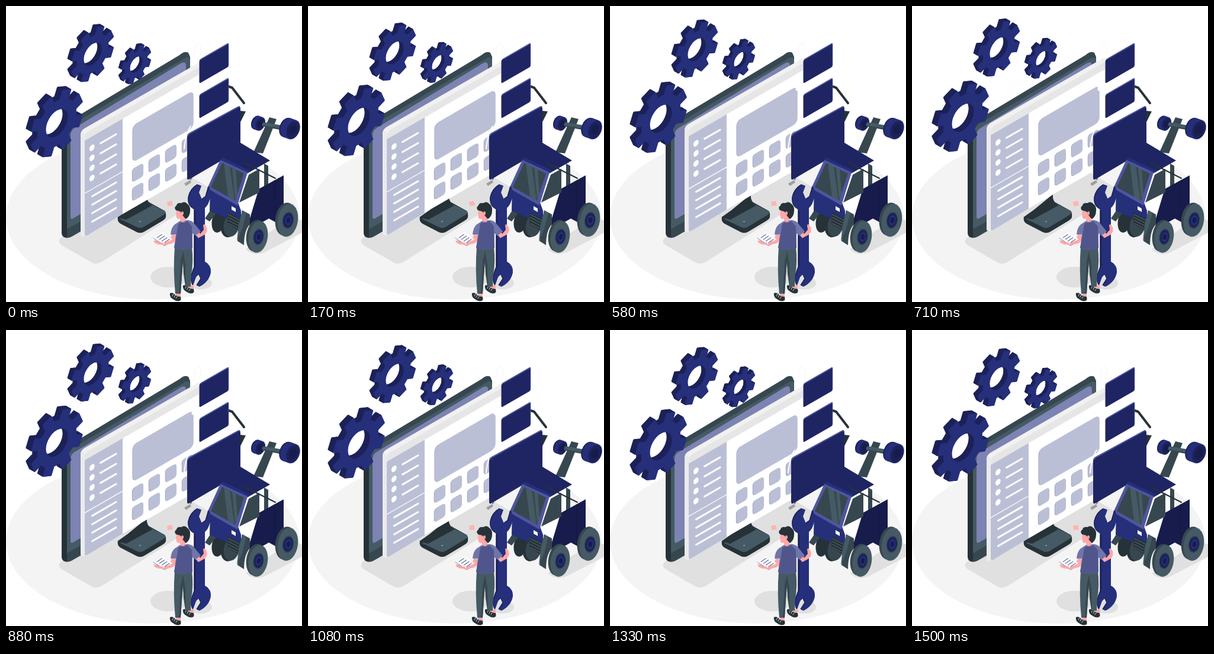
These frames come from a looping animation (500x500 px, 1.54 s). An HTML page with a canvas:

```html
<!DOCTYPE html>
<html lang="en">
<head>
<meta charset="utf-8">
<style>
html, body { margin: 0; width: 100%; height: 100%; overflow: hidden; background: #fff; }
canvas { display: block; width: 500px; height: 500px; }
</style>
</head>
<body>
<canvas id="stage"></canvas>
<script>
const LOOP = 1540, FRAME = 1000 / 24, FRAMES = 37, LIFT = 10;
const COS = 0.866, SIN = 0.5;
const NAVY = '#262f7a', DEEP = '#1c2258', NIGHT = '#171c4c', PANEL = '#1f2562', EDGE = '#4f569f';
const SLATE = '#455a64', STEEL = '#37474f', INK = '#263238';
const LILAC = '#bbbfd6', SCREEN = '#7d83b2', SKIN = '#ffa8a7', SLEEVE = '#7075a9', VEST = '#50568c';

const canvas = document.getElementById('stage');
const ctx = canvas.getContext('2d');
const scale = window.devicePixelRatio || 1;
canvas.width = canvas.height = 500 * scale;

function fill(color, path) {
  ctx.fillStyle = color;
  ctx.fill(new Path2D(path));
}

function line(color, width, path) {
  ctx.strokeStyle = color;
  ctx.lineWidth = width;
  ctx.lineCap = ctx.lineJoin = 'round';
  ctx.stroke(new Path2D(path));
}

function oval(color, x, y, rx, ry, tilt = 0) {
  ctx.fillStyle = color;
  ctx.beginPath();
  ctx.ellipse(x, y, rx, ry, tilt, 0, Math.PI * 2);
  ctx.fill();
}

// Draws on the isometric plane that rises to the right, with its origin at x, y.
function onWall(x, y, draw) {
  ctx.save();
  ctx.transform(COS, -SIN, 0, 1, x, y);
  draw();
  ctx.restore();
}

// Rounded wall rectangle whose top left corner is x, y; width is measured on screen.
function wallRect(color, x, y, width, height, radius) {
  onWall(x, y, () => {
    ctx.fillStyle = color;
    ctx.beginPath();
    ctx.roundRect(0, 0, width / COS, height, radius);
    ctx.fill();
  });
}

function gearPath(radius) {
  const path = new Path2D();
  const rad = Math.PI / 180;
  for (let i = 0; i < 8; i++) {
    const mid = 22.5 + i * 45;
    for (const [turn, size] of [[-13, 0.72], [-9.5, 0.98], [9.5, 0.98], [13, 0.72]]) {
      const a = (mid + turn) * rad, r = radius * size;
      path.lineTo(Math.cos(a) * r, -Math.sin(a) * r);
    }
  }
  path.closePath();
  const hole = radius * 0.44;
  path.moveTo(hole, 0);
  path.arc(0, 0, hole, 0, Math.PI * 2);
  return path;
}

function gear(x, y, radius) {
  const path = gearPath(radius), steps = 20;
  for (let i = steps; i >= 0; i--) {
    const depth = radius * 0.2 * i / steps;
    onWall(x - depth * COS, y - depth * SIN, () => {
      ctx.fillStyle = ctx.strokeStyle = i ? DEEP : NAVY;
      ctx.lineWidth = radius * 0.05;
      ctx.lineJoin = 'round';
      ctx.fill(path, 'evenodd');
      ctx.stroke(path);
    });
  }
}

function floor() {
  oval('#f4f4f4', 248, 357, 248, 139);
  fill('#e0e0e0', 'M92 392L285 272L352 312L162 432Q153 438 144 433L94 404Q86 398 92 392Z');
  oval('#e0e0e0', 275, 458, 31, 17.5);
  oval('#e0e0e0', 328, 468, 20, 11);
  fill('#e0e0e0', 'M405 411L482 356L500 362L500 383L437 416Q420 424 405 411Z');
}

function monitor() {
  fill(STEEL, 'M94 216Q94 204 106 195L293 83Q302 75 308 79L311 86L311 274L112 389Q104 394 97 390Q94 387 94 382Z');
  fill(SLATE, 'M103 216Q103 207 112 200L299 90Q311 82 311 94L311 258L103 377Z');
  fill(INK, 'M94 216L103 219L103 391Q94 391 94 382Z');
  fill(SCREEN, 'M109 218Q109 210 116 206L295 97Q304 92 304 101L304 247L113 359Q109 361 109 356Z');
}

function stand() {
  fill(INK, 'M189 357L239 330L268 346Q271 349 270 357Q269 360 264 363L234 381Q228 385 221 382L194 368Q187 364 189 357Z');
  fill(SLATE, 'M194 358L243 334L267 346Q272 349 266 353L233 373Q227 377 220 373L193 360Z');
  fill(INK, 'M188 357L205 345L238 318L238 324Q240 333 247 337L203 361Z');
  oval('#cfd8dc', 226.5, 364, 1.2, 0.8);
}

function browser() {
  fill('#f1f1f1', 'M126 218Q126 211 133 207L326 96L326 112L133 224Z');
  fill('#e6e6e6', 'M133 222Q133 216 139 212L326 104L326 118L133 229Z');
  fill('#ebebeb', 'M126 217Q127 212 133 216L133 390Q127 391 126 387Z');
  fill('#fff', 'M197 191L326 116.5L326 277.5L197 352Z');
  fill(LILAC, 'M133 228L197 191L197 352L137 388Q133 390 133 385Z');

  for (let i = 0; i < 4; i++) {
    const y = i * 17;
    onWall(145.3, 240 + y, () => oval('#fff', 0, 0, 5, 5));
    line('#fff', 3, `M159.5 ${232.5 + y}l26.5 -15.3`);
    line('#fff', 3, `M145.5 ${322 + i * 14.3}l40.5 -23.4`);
  }
  line('#fff', 1.2, 'M133 317L196.5 280.5');

  const card = (x, y, w, h, r) => {
    wallRect('#989dc3', x - 0.5, y + 0.4, w, h, r);
    wallRect(LILAC, x + 0.3, y, w, h, r);
  };
  card(214, 202.5, 102.5, 62, 8);
  for (let row = 0; row < 2; row++) {
    for (let col = 0; col < 4; col++) {
      card(213.3 + col * 28, 276 + row * 32 - col * 16.1, 18.5, 22.5, 5);
    }
  }
}

function panels() {
  line('#f7f7f7', 1.2, 'M318 84Q317 66 325 62Q331 62 328 82');
  oval('#fff', 316, 140, 2.4, 3.5);
  line('#fff', 2, 'M312 203Q304 214 301 241');
  line(INK, 4, 'M376 136L382 138L402 164');
  fill(INK, 'M395 177L405 178L395 198Z');
  fill('#9e9e9e', 'M301 300L311 294L313 298L304 304Z');
  line('#757575', 2, 'M312 293L315 287');

  for (const y of [90.5, 149.5]) {
    wallRect(EDGE, 326.5, y, 49.8, 40.5, 3);
    wallRect(PANEL, 326.8, y + 1.8, 48.7, 38.3, 2);
  }
  fill(EDGE, 'M306 220Q306 216 310 214L391 170Q396 167 396 173L396 240L306 290Z');
  fill(PANEL, 'M306 221L311 216L392 171.5Q395.5 170 396 174L396 239Q396 242 393 244L310 292.5Q306 295 306 290Z');
  line(DEEP, 1, 'M317 279L317 288');
}

function roller(x, y, r, length) {
  const dy = length * 0.18;
  for (let i = 0; i <= length; i++) {
    oval(i < 2 ? DEEP : NAVY, x - length / 2 + i, y - dy + i * 0.36, r * 0.66, r, 0.4);
  }
  oval(DEEP, x + length / 2, y + dy, r * 0.6, r * 0.9, 0.4);
  oval(NIGHT, x + length / 2 + 0.5, y + dy, r * 0.36, r * 0.52, 0.4);
}

function wheel(x, y, rx, ry) {
  oval(STEEL, x - 4, y - 2, rx, ry, 0.16);
  oval(SLATE, x, y, rx, ry, 0.16);
  oval(STEEL, x + 0.5, y, rx * 0.56, ry * 0.52, 0.16);
  oval(DEEP, x + 0.5, y, rx * 0.5, ry * 0.45, 0.16);
  oval(NAVY, x + 1, y, rx * 0.32, ry * 0.3, 0.16);
  oval(NIGHT, x + 1, y, rx * 0.2, ry * 0.18, 0.16);
}

function machine() {
  fill(STEEL, 'M445 188L457 191L434 249L418 247Z');
  roller(426, 198, 12, 7);
  line(SLATE, 7, 'M436 200L470 206');
  line(STEEL, 2, 'M436 203L468 209');
  roller(479, 207, 17, 11);

  oval(INK, 359, 363, 11, 20, 0.2);
  oval(INK, 377, 369, 14, 22, 0.2);
  oval(STEEL, 381, 370, 13, 20, 0.2);
  fill(STEEL, 'M336 359L350 338L355 350L344 364Z');

  fill('#fff', 'M391 334L409 281L437 266L437 306L427 309L412 355L399 346Z');
  fill(STEEL, 'M436 266L443 270L443 305L436 308Z');
  fill(NIGHT, 'M427 309L469 286L469 345L455 365L444 359L412 377L411 362Z');
  line('#12163f', 1, 'M454 295L454 354');

  fill(NAVY, 'M345 304L392 332L397 346L397 372L372 358L344 346Z');
  fill(PANEL, 'M361 260L396 231L446 261L409 282Z');
  fill(NAVY, 'M361 260L366 256L412 278L408 283Z');
  fill(STEEL, 'M410 285L428 275L428 315L394 332Z');
  fill(EDGE, 'M362 260L408 281L391 337L340 308Z');
  fill(STEEL, 'M365 265L402 283L387 329L346 306Z');
  fill(SLATE, 'M368 266L378 271L386 329L375 322ZM382 273L388 276L391 317L387 326Z');
  line(INK, 2, 'M403 265L455 291');

  fill('#fff', 'M381 338L388 342L388 348L381 344Z');
  fill(INK, 'M374 348L397 360L397 381L374 368Z');
  for (let i = 0; i < 4; i++) line('#596d76', 1, `M375 ${352 + i * 5}l20 10`);
  fill(STEEL, 'M399 345L412 352L412 369Q402 379 402 404L391 397Z');
  fill(SLATE, 'M399 345L406 350L399 376L390 397L393 370Z');
  wheel(476, 362, 17, 28);
  wheel(426, 390, 16, 27);
}

function wrench() {
  const shape = 'M319 344Q307 338 309 323Q312 309 324 302L330 304L326 315L331 327L338 322L343 305Q349 317 343 330Q341 337 336 341L336 432Q347 438 346 450Q343 466 327 474L323 472L330 461L326 453L321 458L316 472Q311 460 316 449L319 441Z';
  for (let depth = 4; depth >= 0; depth--) {
    ctx.save();
    ctx.translate(-depth * 0.4, -depth * 0.2);
    fill(depth ? DEEP : NAVY, shape);
    ctx.restore();
  }
  line(DEEP, 2.5, 'M319 347L319 439');
}

function person() {
  fill('#ffb5b0', 'M272 331L280 329L282 337L273 338Z');

  for (const [x, y] of [[277, 486], [299, 473]]) {
    fill(SKIN, `M${x + 10} ${y - 1}h8v7h-7Z`);
    fill(INK, `M${x} ${y - 1}q5 -2 9 3q3 3 9 3q1 4 0 6q-4 3 -10 0q-10 -5 -8 -12Z`);
    line('#fff', 0.8, `M${x + 4} ${y + 4}l2 -4m1 6l2 -4m1 6l2 -3`);
  }
  fill(SLATE, 'M285 407L314 407Q317 432 313 454L312 474L303 475L300 452L299 431L297 456L295 486L286 486Q282 445 285 407Z');
  fill(STEEL, 'M299 414L303 436L304 474L300 452L299 431L297 456L295 486L292 486L295 431Z');

  fill(SKIN, 'M280 386L291 387Q288 397 281 401L266 404L252 401L249 396L260 397L278 392Z');
  fill(SKIN, 'M315 381L324 376L328 385L334 378L333 370Q336 367 339 374Q341 381 336 386L325 392Z');
  fill(SLEEVE, 'M285 369L296 362L309 362Q317 364 320 370L329 381L320 388L315 384L314 409Q300 414 284 409L287 386L278 386Q279 374 285 369Z');
  fill(VEST, 'M291 368L297 363L306 363L314 372L315 409Q300 414 284 409L288 387Z');
  line(SLEEVE, 1.4, 'M292 365L302 365L307 362');

  fill(SKIN, 'M288 344Q295 338 302 344L304 354L303 363Q299 367 294 363L294 359Q289 361 288 357L287 351Z');
  fill(INK, 'M287 345Q283 340 288 337Q289 332 296 333Q302 329 306 334Q312 338 311 346Q311 355 304 360L301 357L298 353Q296 346 290 346Z');
  oval(SKIN, 298, 350, 2, 3);
  line('#df7f80', 0.7, 'M297 349l1 2');

  fill('#fff', 'M249 392L264 382L281 394L268 405Z');
  line(SLATE, 0.7, 'M249 392L268 405L277 400');
  for (let i = 0; i < 4; i++) {
    line(NAVY, 1, `M${255 + i * 4.2} ${391.5 + i * 2.8}l8.5 -5.8`);
  }
  line(SKIN, 3.5, 'M252 398L257 401L264 401');
  line(SKIN, 5, 'M269 402L282 397');
}

function draw(time) {
  const step = (Math.floor((time % LOOP + 5) / FRAME) + 1) % FRAMES;
  const rise = LIFT * (1 - Math.abs(1 - 2 * step / FRAMES));

  ctx.setTransform(scale, 0, 0, scale, 0, 0);
  ctx.fillStyle = '#fff';
  ctx.fillRect(0, 0, 500, 500);
  floor();
  monitor();
  stand();

  ctx.save();
  ctx.translate(0, -rise);
  browser();
  gear(86, 198.5, 51.5);
  gear(146.5, 82, 42);
  gear(220, 99.5, 29.5);
  ctx.restore();

  panels();
  machine();
  wrench();
  person();
}

const start = performance.now();
function tick() {
  draw(performance.now() - start);
  requestAnimationFrame(tick);
}
tick();
</script>
</body>
</html>
```
